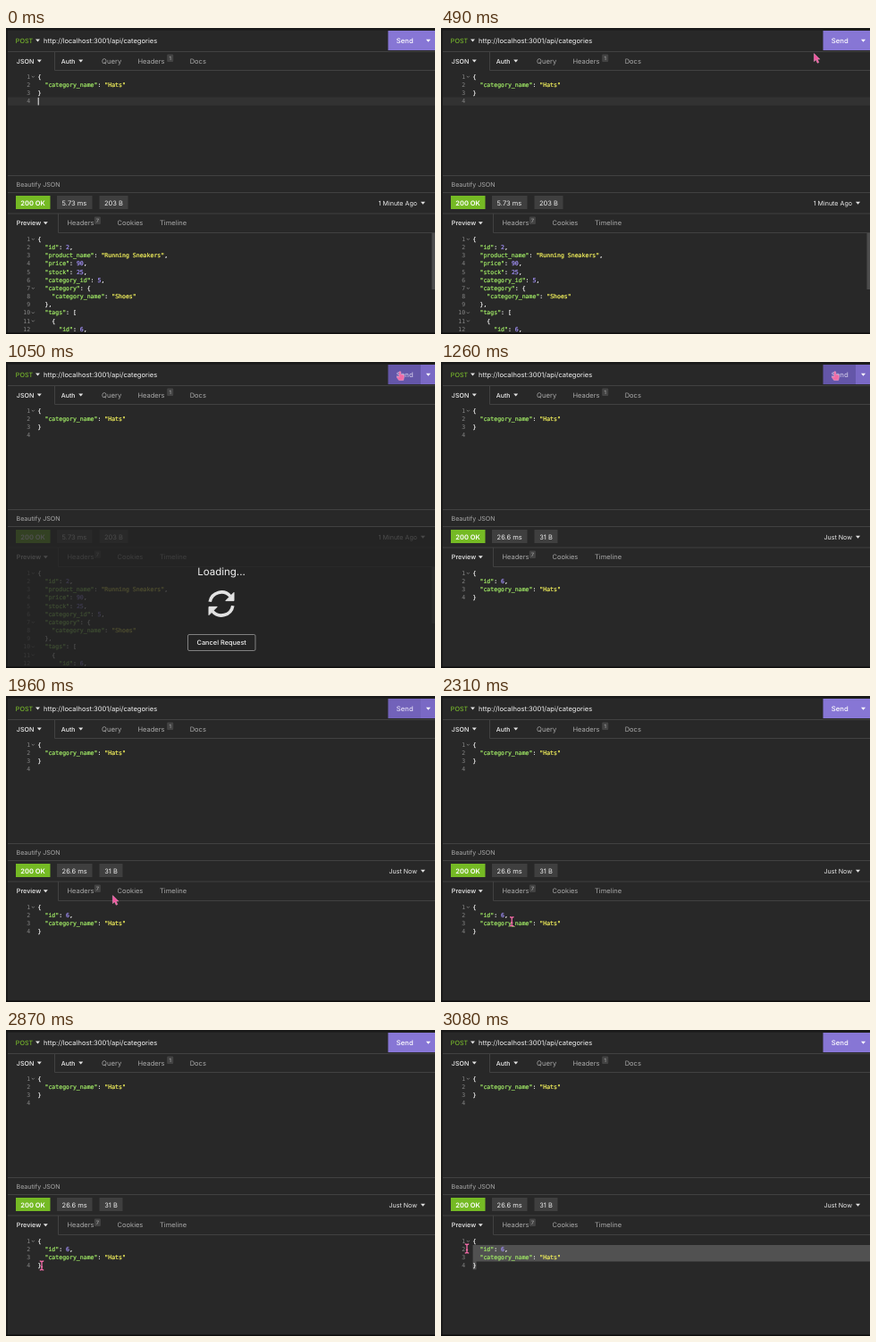
An HTML page that plays this animation: 480x343 px, repeating every 3.15 s.

```html
<!DOCTYPE html>
<html lang="en">
<head>
<meta charset="utf-8">
<title>API client</title>
<style>
  html, body { margin: 0; width: 100%; height: 100%; overflow: hidden; background: #282828; }
  svg { display: block; width: 100vw; height: 100vh; }
  text { font-family: Inter, sans-serif; font-size: 7.5px; fill: #ececec; white-space: pre; text-rendering: geometricPrecision; }
  .code text { font-family: "DejaVu Sans Mono", monospace; font-size: 6.54px; }
  text.num { fill: #868686; }
  tspan { stroke-width: .22px; stroke: #ececec; }
  .key { fill: #9fe765; stroke: #9fe765; }
  .str { fill: #f3f15c; stroke: #f3f15c; }
  .val { fill: #a08ff5; stroke: #a08ff5; }
</style>
</head>
<body>
<svg id="stage" viewBox="0 0 480 343" preserveAspectRatio="none"></svg>
<script>
const LOOP = 3150, STEP = 70;
const CLICK = 910, RESPONSE = 1190;
const CHAR = 3.937, CODE_X = 35.6, LINE = 9.17;
const REQUEST_Y = 56.8, REPLY_Y = 238.9;
const stage = document.getElementById('stage');

function add(parent, tag, attrs = {}, content) {
  const node = document.createElementNS('http://www.w3.org/2000/svg', tag);
  for (const [name, value] of Object.entries(attrs)) node.setAttribute(name, value);
  if (content !== undefined) node.textContent = content;
  parent.appendChild(node);
  return node;
}
const group = (parent = stage, attrs) => add(parent, 'g', attrs);
const rect = (p, x, y, width, height, fill, more) => add(p, 'rect', { x, y, width, height, fill, ...more });
const path = (p, d, fill, more) => add(p, 'path', { d, fill, ...more });
const label = (p, x, y, content, fill = '#ececec', size = 7.5, weight = 400, anchor = 'start') =>
  add(p, 'text', { x, y, 'text-anchor': anchor, style: `fill:${fill};font-size:${size}px;font-weight:${weight}` }, content);
const caretDown = (p, x, y, fill = '#e4e4e4') => path(p, `M${x - 2.5} ${y - 1.5}h5l-2.5 3z`, fill);
const show = (node, on) => node.setAttribute('visibility', on ? 'visible' : 'hidden');
const lineNumber = (p, y, n) => add(p, 'text', { x: 27.2, y, class: 'num', 'text-anchor': 'end' }, n);

function codeBlock(parent, lines, baseline) {
  const block = group(parent, { class: 'code' });
  lines.forEach((line, i) => {
    const y = baseline + i * LINE;
    lineNumber(block, y, i + 1);
    if (/[{[]$/.test(line)) path(block, `M28.8 ${y - 3}l1.5 1.6 1.5-1.6`, 'none', { stroke: '#858585', 'stroke-width': .8 });
    const indent = Math.max(0, line.search(/\S/));
    const row = add(block, 'text', { x: CODE_X + indent * CHAR, y });
    for (const token of line.trim().match(/"[^"]*"|\d+|[^"\d]+/g) || []) {
      const isKey = token[0] === '"' && line.includes(token + ':');
      const kind = isKey ? 'key' : token[0] === '"' ? 'str' : /^\d/.test(token) ? 'val' : '';
      add(row, 'tspan', { class: kind }, token);
    }
  });
}

function tabRow(parent, top, bottom, firstEnd) {
  path(parent, `M2 ${top}H480M${firstEnd} ${top}V${bottom}H480`, 'none', { stroke: '#414141', 'stroke-width': 1 });
}

function badge(parent, x, y, value) {
  rect(parent, x, y, 7, 8.6, '#434343', { rx: 1 });
  label(parent, x + 3.5, y + 6.4, value, '#b4b4b4', 5.8, 400, 'middle');
}

function statusBar(parent, time, size, age) {
  const top = 188, height = 15, width = size.length > 4 ? 32 : 26;
  rect(parent, 11, top, 38.5, height, '#75ba24');
  label(parent, 16.3, 198.6, '200 OK', '#fff', 7.5, 600);
  rect(parent, 57, top, 39.5, height, '#3f3f3f');
  label(parent, 62.6, 198.6, time);
  rect(parent, 104.5, top, width, height, '#3f3f3f');
  label(parent, 104.5 + width / 2, 198.6, size, '#ececec', 7.5, 400, 'middle');
  label(parent, 460, 198.6, age, '#ececec', 7.1, 400, 'end');
  caretDown(parent, 466.5, 196.3);
}

// Request pane
rect(stage, 0, 0, 480, 343, '#282828');
const activeLine = rect(stage, 2, 77.6, 478, 9.2, '#323232');
label(stage, 10.8, 16.6, 'POST', '#82cc2c', 7.2);
caretDown(stage, 35.5, 14);
label(stage, 42, 16.6, 'http://localhost:3001/api/categories', '#f2f2f2', 7.55);
const sendBox = rect(stage, 427.5, 3, 36.5, 22, '#8776d5');
const dropBox = rect(stage, 464, 3, 16, 22, '#8776d5');
const sendText = label(stage, 436.8, 16.7, 'Send', '#fff', 7.7, 500);
caretDown(stage, 472.5, 14.3, '#fff');

tabRow(stage, 26.5, 47.5, 54.5);
label(stage, 11.8, 39.5, 'JSON', '#f0f0f0', 7.1, 500);
caretDown(stage, 37.3, 37);
label(stage, 61.8, 39.5, 'Auth', '#f0f0f0', 7, 500);
caretDown(stage, 83.7, 37);
label(stage, 107, 39.5, 'Query', '#a9a9a9', 7.7);
label(stage, 147.5, 39.5, 'Headers', '#a9a9a9');
badge(stage, 180.2, 29.4, 1);
label(stage, 205.7, 39.5, 'Docs', '#a9a9a9');
codeBlock(stage, ['{', '  "category_name": "Hats"', '}', ''], REQUEST_Y);
const textCaret = rect(stage, 35.7, 78, 1, 8.5, '#eee');
rect(stage, 2, 165, 478, 1, '#414141');
label(stage, 11.5, 177.8, 'Beautify JSON', '#a9a9a9', 7.1);
rect(stage, 2, 184, 478, 1, '#414141');

// Response pane
const selection = path(stage, '', '#515151');
tabRow(stage, 208, 229.5, 58.5);
label(stage, 11.8, 221.2, 'Preview', '#f0f0f0', 7.2, 500);
caretDown(stage, 44.3, 218.7);
label(stage, 68.5, 221.2, 'Headers', '#a9a9a9');
badge(stage, 98.9, 211.4, 7);
label(stage, 124.6, 221.2, 'Cookies', '#a9a9a9');
label(stage, 172, 221.2, 'Timeline', '#a9a9a9');

const before = group();
statusBar(before, '5.73 ms', '203 B', '1 Minute Ago');
codeBlock(before, [
  '{', '  "id": 2,', '  "product_name": "Running Sneakers",', '  "price": 90,', '  "stock": 25,',
  '  "category_id": 5,', '  "category": {', '    "category_name": "Shoes"', '  },',
  '  "tags": [', '    {', '      "id": 6,'
], REPLY_Y);
rect(before, 476.5, 230, 3.5, 63, '#4c4c4c');

const after = group();
const reply = ['{', '  "id": 6,', '  "category_name": "Hats"', '}'];
statusBar(after, '26.6 ms', '31 B', 'Just Now');
codeBlock(after, reply, REPLY_Y);

const overlay = group();
rect(overlay, 2, 185, 478, 157, '#242424', { opacity: .8 });
label(overlay, 241, 238.6, 'Loading...', '#f2f2f2', 11.5, 400, 'middle');
const spinner = group(overlay);
for (const turn of [0, 180]) {
  const half = group(spinner, { transform: `rotate(${turn})` });
  path(half, 'M-12.8-2.2A13 13 0 0 1 10-8.3', 'none', { stroke: '#e2e2e2', 'stroke-width': 3.6 });
  path(half, 'M14-12.6V-3.4H4.8z', '#e2e2e2', { stroke: '#e2e2e2', 'stroke-linejoin': 'round' });
}
rect(overlay, 203.5, 305.5, 75.5, 18, 'none', { rx: 1.5, stroke: '#9a9a9a', 'stroke-width': .8 });
label(overlay, 241.2, 317.2, 'Cancel Request', '#f2f2f2', 7.4, 500, 'middle');

// Window edges
rect(stage, 0, 0, 480, 2.5, '#191919');
rect(stage, 0, 0, 1.8, 343, '#191919');
rect(stage, 0, 341.5, 480, 1.5, '#0c0c0c');

// Pointers, each with its hot spot at the origin
const pointer = group();
const outline = { stroke: '#f6b4d2', 'stroke-width': .45, 'stroke-linejoin': 'round' };
const shapes = {
  arrow: path(pointer, 'M.4 .6V9.6L2.5 7.7 4.2 11.3 5.8 10.6 4.2 7.1H6.9z', '#f0559f', outline),
  hand: path(pointer, 'M-1.2-4Q0-5 .8-4V-1.2L3.7-.5Q4.8 0 4.5 1.4L3.7 5.4H-1.4L-3.8 2Q-3.7 .7-2.4 1.2L-1.2 1.9z', '#f06aa6', outline),
  beam: path(pointer, 'M-2.2-5Q0-5 0-3.7Q0-5 2.2-5M0-3.7V3.7M-2.2 5Q0 5 0 3.7Q0 5 2.2 5M-1.1 1.5H1.1', 'none',
    { stroke: '#f46ca8', 'stroke-width': 1.3 })
};

// time, x, y
const route = [
  [70, 402, 182], [280, 407, 95], [490, 417, 28], [700, 441, 15], [1540, 441, 15],
  [1680, 385, 50], [1820, 215, 160], [1960, 119, 223], [2100, 92, 243], [2380, 75, 256],
  [2660, 72, 258], [2800, 42, 265], [2870, 40, 264], [3080, 29, 245]
];
function pointerAt(t) {
  const next = route.findIndex(stop => stop[0] >= t);
  if (next <= 0) return route[0].slice(1);
  const [t0, x0, y0] = route[next - 1], [t1, x1, y1] = route[next];
  const k = (t - t0) / (t1 - t0);
  return [x0 + (x1 - x0) * k, y0 + (y1 - y0) * k];
}

function selectionPath(x, y) {
  const top = REPLY_Y - 7;
  const row = Math.min(3, Math.max(0, Math.floor((y - top) / LINE)));
  const col = Math.min(reply[row].length, Math.max(0, Math.round((x - CODE_X) / CHAR)));
  const left = CODE_X + col * CHAR, rowTop = top + row * LINE, lastTop = top + 3 * LINE;
  const end = CODE_X + CHAR;
  if (row === 3) return `M${left} ${lastTop}H${end}v${LINE}H${left}z`;
  return `M${left} ${rowTop}H480V${lastTop}H${end}v${LINE}H${CODE_X}V${rowTop + LINE}H${left}z`;
}

function draw(t) {
  const [x, y] = pointerAt(t);
  const onSend = x > 427 && y < 26;
  const inEditor = (y > 48 && y < 165) || y > 230;
  const kind = onSend ? 'hand' : inEditor ? 'beam' : 'arrow';
  show(pointer, t >= 70);
  pointer.setAttribute('transform', `translate(${x} ${y})`);
  for (const name in shapes) shapes[name].setAttribute('display', name === kind ? 'inline' : 'none');

  const focused = t >= CLICK && t < 2170;
  sendBox.setAttribute('fill', onSend ? '#6456a8' : focused ? '#7262ba' : '#8776d5');
  dropBox.setAttribute('fill', focused ? '#7a69c5' : '#8776d5');
  sendText.style.fill = onSend ? '#c9c3e4' : focused ? '#e1dcf5' : '#fff';

  show(activeLine, t < CLICK);
  show(textCaret, t < 300);
  show(before, t < RESPONSE);
  show(after, t >= RESPONSE);
  show(overlay, t >= CLICK && t < RESPONSE);
  overlay.setAttribute('opacity', Math.max(0, Math.min(1, (t - CLICK + STEP) / 140)));
  spinner.setAttribute('transform', `translate(241 271) rotate(${(t - 1050) * .18})`);
  selection.setAttribute('d', t >= 2870 ? selectionPath(x, y) : '');
}

const start = performance.now();
function tick() {
  const t = (performance.now() - start) % LOOP;
  draw(Math.floor(t / STEP) * STEP);
  requestAnimationFrame(tick);
}
tick();
</script>
</body>
</html>
```
